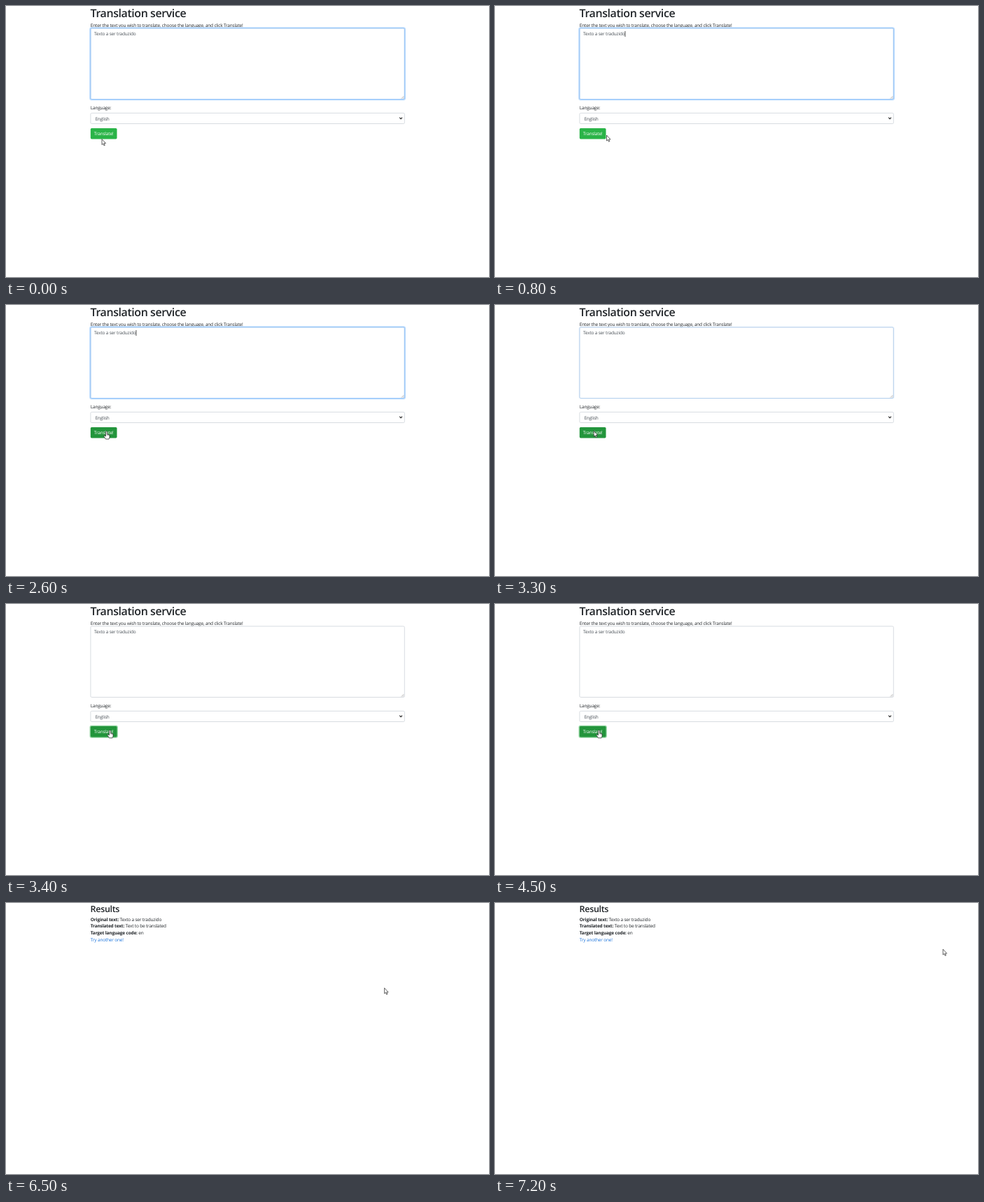
An HTML page that plays this animation: 690 px wide and 388 px high, repeating every 7.3 s.

```html
<!DOCTYPE html>
<html lang="en">
<head>
<meta charset="utf-8">
<title>Translation service</title>
<style>
html, body { margin: 0; width: 100%; height: 100%; overflow: hidden; background: #fff; }
svg { display: block; width: 690px; height: 388px; }
text {
  font: 6.46px "Open Sans", "Noto Sans", sans-serif;
  letter-spacing: -.025em; fill: #212529; text-rendering: geometricPrecision;
}
.h1 { font-size: 15.95px; font-weight: 600; }
.h2 { font-size: 12.5px; font-weight: 600; }
.b { font-weight: 700; letter-spacing: -.022em; }
.field { fill: #495057; }
.box { fill: #fff; stroke: #ced4da; stroke-width: .8; }
.cursor { fill: #fff; stroke: #222; stroke-width: .7; stroke-linejoin: round; }
</style>
</head>
<body>
<svg viewBox="0 0 690 388">
  <g id="form">
    <text class="h1" x="120.6" y="16.2">Translation service</text>
    <text x="120.8" y="29.9">Enter the text you wish to translate, choose the language, and click Translate!</text>
    <rect id="ring" x="120.1" y="31.1" width="450" height="103.2" rx="2.2" fill="none" stroke="#bfdeff" stroke-width="1.9"/>
    <rect class="box" x="120.9" y="31.9" width="448.4" height="101.6" rx="1.6"/>
    <rect id="edge" x="120.9" y="31.9" width="448.4" height="101.6" rx="1.6" fill="none" stroke="#80bdff" stroke-width=".8"/>
    <path d="M564.8 132.6l3.6-3.6M566.8 132.6l1.6-1.6" stroke="#777" stroke-width=".5"/>
    <text class="field" x="125.9" y="42.4">Texto a ser traduzido</text>
    <path id="caret" d="M185.9 36V44" stroke="#222" stroke-width=".8"/>
    <text x="120.8" y="148.1">Language:</text>
    <rect class="box" x="120.9" y="153.3" width="448.4" height="15.2" rx="1.6"/>
    <text class="field" x="127.4" y="163.5">English</text>
    <path d="M562.2 159.7l1.9 1.9 1.9-1.9" fill="none" stroke="#222" stroke-width="1.1"/>
    <rect id="halo" x="119.5" y="173.7" width="40.3" height="18" rx="2.6" fill="#94d6a2"/>
    <rect id="button" x="120.8" y="175" width="37.7" height="15.4" rx="1.6"/>
    <text x="125.8" y="185.4" style="fill:#fff">Translate!</text>
  </g>
  <g id="results">
    <text class="h2" x="120.6" y="13.2">Results</text>
    <text x="120.8" y="25.7"><tspan class="b">Original text:</tspan> Texto a ser traduzido</text>
    <text x="120.8" y="35.3"><tspan class="b">Translated text:</tspan> Text to be translated</text>
    <text x="120.8" y="45"><tspan class="b">Target language code:</tspan> en</text>
    <text x="120.8" y="54.6" style="fill:#1c74dc">Try another one!</text>
  </g>
  <path id="arrow" class="cursor" d="M0 0V8L1.8 6.4 3 9.3 4.3 8.7 3.1 6H5.5Z"/>
  <g id="hand" class="cursor">
    <path d="M-1 .9Q0-.4 1 .9V4.2L3.6 5Q4.6 5.4 4.6 6.4V8.5Q4.4 10 3.6 11.4H-1Q-1.6 9.8-3.5 7.6-4 6.3-2.6 6.3L-1 7.4Z"/>
    <path d="M1 4.2V6M2.4 4.7V6.2M3.6 5.1V6.4" stroke-width=".5"/>
  </g>
</svg>
<script>
const LOOP = 7300, STEP = 100, BLINK = 530;
const HOVER = 2000, CLICK = 3200, FOCUS = 3400, RESULT = 5500, LEAVE = 6000;

const $ = id => document.getElementById(id);
const show = (id, on) => $(id).style.display = on ? "" : "none";
const progress = (t, from, to) => Math.min(1, Math.max(0, (t - from) / (to - from)));
const ease = k => k * k * (3 - 2 * k);

// Pointer moves: start time, end time, x, y reached
const moves = [
  [200, 400, 131, 206],
  [400, 600, 156, 209],
  [600, 1000, 163, 161],
  [1000, 1100, 161, 190],
  [1100, 1300, 134, 211],
  [1500, 1700, 169.5, 159.8],
  [1700, 2200, 143.4, 180.6],
  [CLICK - STEP, CLICK, 141.2, 180.4],
  [FOCUS - STEP, FOCUS, 148.4, 180.4],
  [LEAVE, 6600, 572, 117],
  [6600, 6800, 612.2, 84.5],
  [6800, 7200, 640, 66.2]
];

function pointer(t) {
  let x = 137, y = 190.6;
  for (const [from, to, toX, toY] of moves) {
    const k = ease(progress(t, from, to));
    x += (toX - x) * k;
    y += (toY - y) * k;
  }
  return `translate(${x} ${y})`;
}

function draw(time) {
  const t = Math.floor(time % LOOP / STEP) * STEP;
  const focus = 1 - progress(t, CLICK, FOCUS);
  const loading = t >= CLICK && t < FOCUS;
  const hand = t >= HOVER && t <= LEAVE && !loading;

  show("form", t < RESULT);
  show("results", t >= RESULT);
  show("caret", t < CLICK && Math.floor((t + 80) / BLINK) % 2);
  show("halo", t >= FOCUS);
  $("edge").style.opacity = focus;
  $("ring").style.opacity = focus ** 3;
  $("button").style.fill = t < HOVER ? "#2ab448" : "#23953c";

  show("hand", hand);
  show("arrow", !hand);
  $(hand ? "hand" : "arrow").setAttribute("transform", pointer(t));
}

const start = performance.now();
function frame() {
  draw(performance.now() - start);
  requestAnimationFrame(frame);
}
frame();
</script>
</body>
</html>
```
